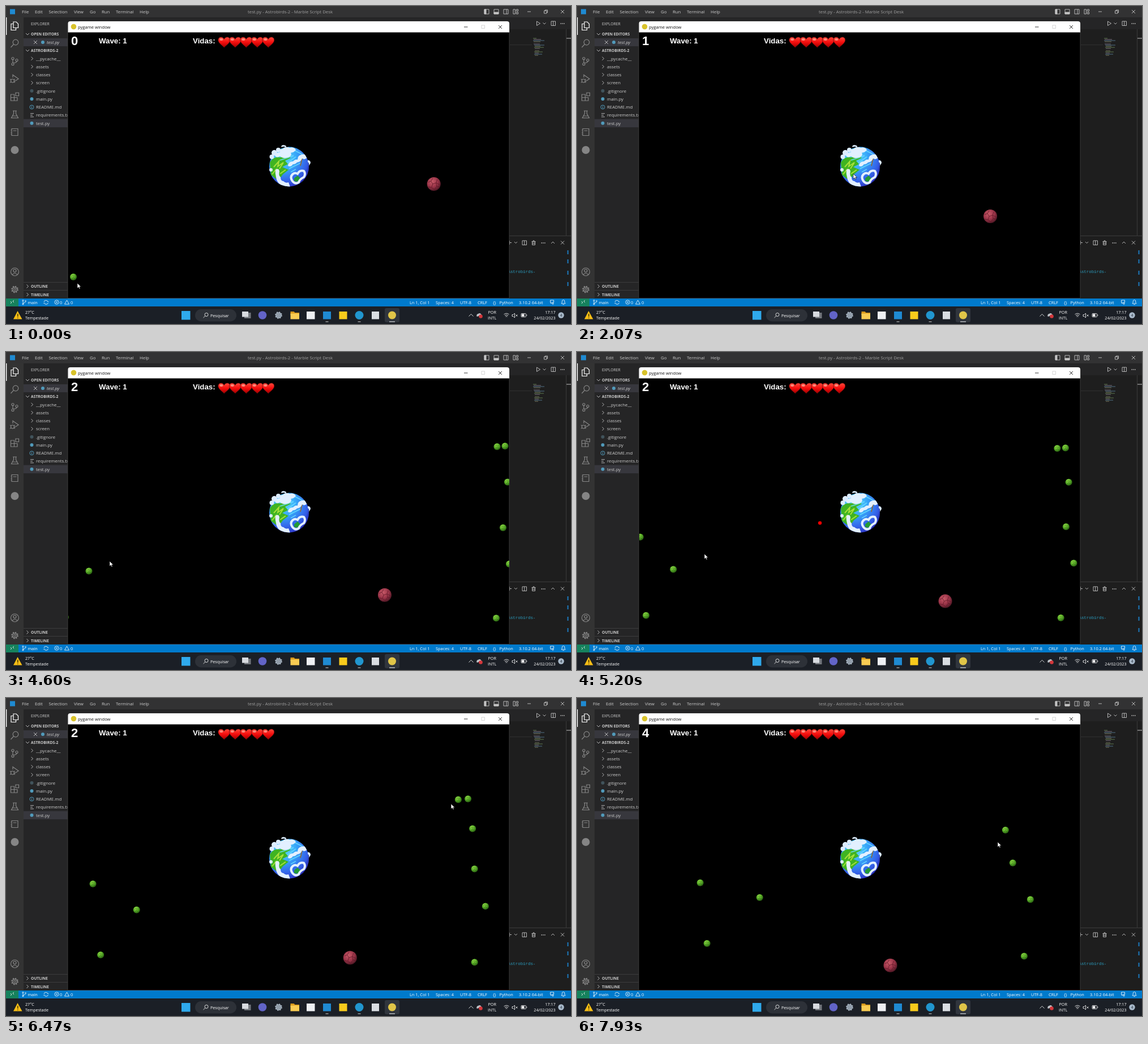
Recreate the animation shown at these times as an HTML page. Size 998 px wide and 561 px high, loop 8000 ms.

```html
<!DOCTYPE html>
<html lang="pt">
<head>
<meta charset="utf-8">
<title>Planet defence</title>
<style>
html, body { margin: 0; width: 100%; height: 100%; overflow: hidden; background: #1e1e1e; }
svg { display: block; width: 998px; height: 561px; }
text { font-family: "Open Sans", "Noto Sans", sans-serif; font-size: 7.8px; fill: #ccc; white-space: pre; }
.small { font-size: 6.8px; }
.bold { font-weight: 700; }
.status text { font-size: 7.4px; fill: #fff; }
.task text { font-size: 7.2px; fill: #fff; }
.hud text { font: 700 13.3px "Liberation Sans", Arial, sans-serif; fill: #fff; }
.hud .score { font-size: 22px; }
.line { fill: none; stroke: #c5c5c5; stroke-width: .9; }
.idle { fill: none; stroke: #858585; stroke-width: 1.2; }
.thin { fill: none; stroke: #fff; stroke-width: .8; }
</style>
</head>
<body>
<svg viewBox="0 0 998 561" xmlns="http://www.w3.org/2000/svg">
<defs>
  <clipPath id="field"><rect x="110" y="46.500" width="779" height="468"/></clipPath>
  <clipPath id="globe"><circle cx="500" cy="283.500" r="35"/></clipPath>
  <radialGradient id="sea" cx=".35" cy=".25" r=".85">
    <stop offset="0" stop-color="#62e0ff"/><stop offset=".4" stop-color="#36a4f8"/><stop offset=".7" stop-color="#3466ea"/><stop offset="1" stop-color="#2c2cc0"/>
  </radialGradient>
  <radialGradient id="leaf" cx=".38" cy=".3" r=".75">
    <stop offset="0" stop-color="#98e04a"/><stop offset=".5" stop-color="#58ac28"/><stop offset="1" stop-color="#22560e"/>
  </radialGradient>
  <radialGradient id="rust" cx=".38" cy=".32" r=".75">
    <stop offset="0" stop-color="#c85a68"/><stop offset=".55" stop-color="#9a3448"/><stop offset="1" stop-color="#451420"/>
  </radialGradient>
  <linearGradient id="red" x2="0" y2="1">
    <stop offset="0" stop-color="#ff4a3c"/><stop offset=".5" stop-color="#f50d0d"/><stop offset="1" stop-color="#a00000"/>
  </linearGradient>
  <g id="heart">
    <path d="M0 9C-4 5-10.500 1-10.500-4C-10.500-10-2.500-11 0-5.500C2.500-11 10.500-10 10.500-4C10.500 1 4 5 0 9Z" fill="url(#red)" stroke="#6d1010" stroke-width=".8"/>
    <ellipse cx="-5" cy="-5" rx="3" ry="2" fill="#ffb0a0" opacity=".7"/>
  </g>
  <g id="pod">
    <circle r="6" fill="url(#leaf)"/>
    <path d="M-4-1L-1-3L2-1L4-3M-3 3L0 1L3 3M-1-3L0 1" fill="none" stroke="#245c0c" stroke-width=".7" opacity=".6"/>
  </g>
  <path id="chev" d="M-1.500-3L1.500 0L-1.500 3"/>
  <path id="cross" d="M-3-3L3 3M3-3L-3 3"/>
  <g id="gear"><circle r="5" stroke-width="2.800" stroke-dasharray="1.960 1.960"/><circle r="4.200"/><circle r="1.800"/></g>
</defs>

<rect width="998" height="561" fill="#1e1e1e"/>
<rect width="998" height="20" fill="#323233"/>
<rect y="20" width="31" height="496" fill="#333"/>
<rect x="31" y="20" width="281" height="496" fill="#252526"/>
<rect x="312" y="20" width="686" height="21" fill="#252526"/>
<rect x="7" y="5.500" width="9" height="9" fill="#1f8ad2"/>
<g id="menu"></g>
<text x="427" y="13" style="fill:#a0a0a0">test.py - Astrobirds-2 - Marble Script Desk</text>
<g class="line">
  <path d="M845 6h8v8h-8zM862 6h8v8h-8zM879 6h8v8h-8zM884 6v8M896 6h3.500v8h-3.500zM901.500 6h3v3h-3zM901.500 11h3v3h-3z"/>
  <path d="M845 6h3v8h-3zM862 11h8v3h-8z" fill="#c5c5c5"/>
  <path d="M921 10h6M950.500 8.500h4.500v4.500h-4.500zM952 8.500v-1.500h4.500v4.500h-1.500"/>
  <use href="#cross" x="983" y="10"/>
</g>

<rect y="20" width="1.300" height="31" fill="#fff"/>
<g fill="none" stroke="#fff" stroke-width="1.200"><path d="M13 28h5l3.500 3.500v7h-8.500zM13 31.500h-4v11h8.500v-4"/></g>
<g class="idle">
  <circle cx="17" cy="64" r="4.800"/><path d="M13.500 67.500L8.500 73"/>
  <circle cx="12" cy="92.500" r="2"/><circle cx="12" cy="102.500" r="2"/><circle cx="19" cy="95.500" r="2"/><path d="M12 94.500v6M19 97.500q0 3-7 3"/>
  <path d="M12 126v-4.500L22 128.500L15 133"/><circle cx="11.500" cy="132" r="3"/><path d="M7 129l2 1M7 135l2-1M14 130l2-1M14 134l2 1"/>
  <path d="M8.500 156h6v11h-6zM8.500 161.500h11.500v5.500h-5.500M17 153h5.500v5.500h-5.500z"/>
  <path d="M12 185h7M13.500 185v5L9.500 197.500h12L17.500 190v-5M11.500 194h8"/>
  <path d="M10 216.500h11v12h-11zM12.500 220h6M8.500 219h1.500M8.500 223h1.500M8.500 226h1.500"/>
  <circle cx="15.500" cy="469" r="7"/><circle cx="15.500" cy="467" r="2.500"/><path d="M11 474q4.500-5 9 0"/>
  <use href="#gear" x="15.500" y="500"/>
</g>
<circle cx="15.500" cy="254" r="7" fill="#858585"/>

<g id="tree">
  <rect x="31" y="57" width="79" height="14" fill="#37373d"/>
  <rect x="31" y="199.500" width="79" height="14.500" fill="#37373d"/>
  <path d="M31 487.500h79M31 501.500h79" stroke="#3c3c3d"/>
  <text class="small" x="44" y="33.500">EXPLORER</text>
  <text class="small bold" x="44" y="52">OPEN EDITORS</text>
  <text class="small bold" x="44" y="80.800">ASTROBIRDS-2</text>
  <text class="small bold" x="44" y="497">OUTLINE</text>
  <text class="small bold" x="44" y="511.500">TIMELINE</text>
  <text x="72" y="67" font-style="italic">test.py</text>
  <g class="line">
    <path d="M35 48L38 51L41 48M35 77L38 80L41 77"/>
    <use href="#chev" x="38" y="494.500"/><use href="#chev" x="38" y="509"/>
    <use href="#cross" x="52" y="64"/>
  </g>
  <circle cx="65" cy="64" r="3" fill="#519aba"/>
</g>

<g class="line">
  <path d="M937.500 27v7.500l6-3.750zM948.500 29.500l2.500 2.500l2.500-2.500M963 27h7.500v7.500h-7.500zM966.750 27v7.500"/>
  <path d="M979.500 31h7" stroke-width="1.500" stroke-dasharray="1.500 1.250"/>
</g>
<path d="M890 68.500h39" stroke="#303030"/>
<path d="M989.500 41v364M889 405.500h109" stroke="#3a3a3a" fill="none"/>
<path d="M990 57h8" stroke="#aaa" stroke-width="1.200"/>
<g id="minimap"></g>
<g class="line">
  <path d="M886 417.500h7M889.500 414v7M898 416l2.500 2.500l2.500-2.500M912 414h7.500v7.500h-7.500zM915.750 414v7.500M928.500 415.500h7M929.500 415.500v6h5v-6M931 415.500v-1.500h2v1.500M931 417v3M933 417v3M963 419l3-3l3 3"/>
  <path d="M945.500 418h7" stroke-width="1.500" stroke-dasharray="1.500 1.250"/>
  <use href="#cross" x="983" y="417.500"/>
</g>
<text x="886.500" y="470.500" style="font:7.400px 'Liberation Mono',monospace;fill:#2b9ec0">Astrobirds-</text>
<path d="M992.500 431v7M992.500 447v7M992.500 467v7M992.500 487v7" stroke="#1b78bd" stroke-width="2"/>

<g class="status">
  <rect y="516" width="998" height="14" fill="#007acc"/>
  <rect y="516" width="22" height="14" fill="#16825d"/>
  <g id="status"></g>
  <g class="thin">
    <path d="M8 521l2 2l-2 2M14 519l-2 2l2 2M30 520v6M34.500 521.500q0 2-4.500 3"/>
    <circle cx="30" cy="519.500" r="1"/><circle cx="34.500" cy="520.500" r="1"/><circle cx="30" cy="526" r="1"/>
    <path d="M67 522a3.600 3.600 0 0 1 7 0l1.200-1.200M74.500 523.500a3.600 3.600 0 0 1-7 0l-1.200 1.200"/>
    <circle cx="89.500" cy="522.500" r="3.600"/><path d="M88 521l3 3M91 521l-3 3M107.500 519l4 7h-8z"/>
    <path d="M961.500 519h6v4h-3l-2 2v-2h-1zM981 525h7l-1.200-2v-2q0-2.500-2.300-2.500t-2.300 2.500v2zM983.500 526.500h2"/>
    <circle cx="966" cy="525" r="1.200"/>
  </g>
</g>

<g class="task">
  <rect y="530" width="998" height="31" fill="#1b1f26"/>
  <path d="M20.500 538L28.500 552.500H13z" fill="#f6bd16"/><path d="M20.800 543v5M20.800 549.500v1.200" stroke="#3a2a00" stroke-width="1.400"/>
  <rect x="310" y="538" width="15.500" height="15.500" fill="#2fa9ec"/>
  <rect x="334" y="535" width="73" height="21.500" rx="10.700" fill="#2d3138"/>
  <g class="thin"><circle cx="354" cy="544.500" r="3"/><path d="M351.800 546.800L348.500 550"/></g>
  <rect x="421" y="541" width="11.500" height="10" fill="#73777d"/><rect x="417" y="539" width="11" height="9.500" fill="#d8dbe0"/>
  <circle cx="453" cy="545.500" r="7.300" fill="#6264c7"/>
  <circle cx="481.500" cy="545.500" r="5.500" fill="#7d8894"/>
  <g fill="none" stroke="#a3b0bd" stroke-width="1.300"><use href="#gear" x="481.500" y="545.500"/></g>
  <path d="M502.500 539h6l2 2h7.500v4h-15.500z" fill="#d99a1c"/><rect x="502.500" y="542.500" width="15.500" height="10" fill="#f9cc53"/>
  <rect x="531" y="539" width="14.500" height="13.500" fill="#eef0f3"/>
  <rect x="560" y="539" width="14" height="13.500" fill="#1f8ad2"/>
  <rect x="588.500" y="539" width="14" height="13.500" fill="#f8cb1c"/>
  <circle cx="624" cy="545.500" r="7.500" fill="#2196cf"/>
  <rect x="646" y="539" width="13" height="13.500" fill="#d9dde2"/>
  <rect x="669" y="533" width="26" height="25" rx="3" fill="#30353d"/>
  <circle cx="682" cy="545.500" r="7" fill="#e0c548"/>
  <path d="M564.500 557h5M621.500 557h5" stroke="#999" stroke-width="1.500"/><path d="M677 557h10" stroke="#b8bcc2" stroke-width="1.500"/>
  <g class="thin">
    <path d="M817.500 547.500l4-4l4 4"/><path d="M879.500 544q4.500-3.500 9 0M881 546q3-2.200 6 0M882.500 548q1.500-1 3 0"/>
    <path d="M894 544.500h2l2.500-2.500v8l-2.500-2.500h-2zM900.500 544.500l3 3M903.500 544.500l-3 3"/>
    <rect x="910" y="542.500" width="8.500" height="6" rx="1"/><path d="M920 544.500v2"/>
  </g>
  <rect x="911" y="543.500" width="4.500" height="4" fill="#fff"/>
  <path d="M832 548a3 3 0 0 1 2-5q4-2.500 6 2" fill="#bfc3c8"/><circle cx="838.500" cy="547.500" r="3.300" fill="#d4373b"/>
  <g id="tray"></g>
  <circle cx="980.500" cy="545.500" r="5.200" fill="#a9bacb"/><text x="978.800" y="548" style="font-size:6.500px;fill:#16202c">4</text>
</g>

<path d="M109 515.500V31q0-4 4-4H885q4 0 4 4V515.500z" fill="#000" stroke="#444" stroke-width=".8"/>
<path d="M109.500 46.500V31q0-4 4-4H885q4 0 4 4V46.500z" fill="#fff"/>
<circle cx="119.500" cy="36.500" r="4.800" fill="#d9c32b"/>
<text x="127" y="39.500" style="font-size:7.600px;fill:#111">pygame window</text>
<g class="line" style="stroke:#222"><path d="M809 37h6.500"/><use href="#cross" x="873" y="37"/></g>
<rect x="840" y="34" width="5.500" height="5.500" fill="none" stroke="#ccc" stroke-width=".8"/>

<g clip-path="url(#field)">
  <g class="hud">
    <text class="score" id="score" x="115" y="68.500">0</text>
    <text x="164" y="66.300">Wave: 1</text><text x="330" y="66.300">Vidas:</text>
    <g id="lives"></g>
  </g>
  <g id="shots"></g>
  <g>
    <circle cx="500" cy="283.500" r="35" fill="url(#sea)"/>
    <g clip-path="url(#globe)">
      <path d="M466 276Q472 265 484 267L498 264L503 268L493 273L498 279L488 284L499 289L489 297L484 304L477 305L468 298Z" fill="#3fb422"/>
      <path d="M473 284l9-10l-2 9l10-7l-7 11M470 297l8-10M484 296l10-7" fill="none" stroke="#a8e03a" stroke-width="2"/>
      <path d="M484 272L508 264M497 277L512 266M500 287L520 277M508 254L524 262M503 293L512 288" stroke="#6ce0ff" stroke-width="2" opacity=".75"/>
      <path d="M509 304l6-5l5 5l-5 6l-6-1z" fill="#239a35"/>
      <path d="M519 267l4 2l-3 13" fill="none" stroke="#91672d" stroke-width="1.600"/>
      <path d="M536 262Q536 300 503 320L540 321Z" fill="#2424a8" opacity=".35"/>
      <g fill="#e2f0ff">
        <path d="M484 258Q483 252 489 252Q494 246 501 250Q509 248 512 254Q508 259 503 259Q506 264 499 267Q489 270 484 265Q478 269 475 264Q477 258 484 258Z"/>
        <path d="M498 282Q499 274 507 274Q511 270 515 271Q515 263 523 262Q531 260 532 267Q529 272 523 269Q521 275 514 276Q511 280 507 279Q503 285 498 282Z"/>
        <path d="M476 289Q482 285 483 292Q481 299 485 302Q485 309 490 309Q494 313 499 311L502 319H489Q478 312 477 302Q475 295 476 289Z"/>
      </g>
      <path d="M506 309Q501 302 506 297Q510 293 515 296Q519 289 526 291Q530 296 526 302Q519 305 517 311Q511 315 506 309" fill="none" stroke="#e2f0ff" stroke-width="4"/>
    </g>
    <g fill="#dcecff">
      <circle cx="474" cy="259" r="5"/><circle cx="469.500" cy="266" r="4"/><circle cx="481" cy="254" r="4"/>
      <circle cx="468" cy="289" r="3"/><path d="M486 249l1-3q4-2 8 1v2l-5-1zM533 272q5 0 5 5l-3 5q1-5-2-7z"/>
    </g>
  </g>
  <g id="enemies"></g>
  <g id="rock">
    <circle r="12" fill="url(#rust)"/>
    <path d="M-10-3L-5-5L-2-10M-5-5L-2 0L4-2L6-8M4-2L10 1M-2 0L-4 6L-10 5M-4 6L1 10M1 10L5 4L4-2M5 4L10 5" fill="none" stroke="#5c1626" stroke-width="1" opacity=".75"/>
  </g>
</g>
<path id="cursor" d="M0 0V9L2.200 7L3.700 10.200L5.100 9.500L3.700 6.500H6.600Z" fill="#fff" stroke="#000" stroke-width=".6"/>
</svg>

<script>
const $ = id => document.getElementById(id);
const label = (x, y, s, extra = '') => `<text x="${x}" y="${y}" ${extra}>${s}</text>`;
const row = (y, items) => items.map(([x, s]) => label(x, y, s)).join('');

$('menu').innerHTML = row(13, [[28, 'File'], [51, 'Edit'], [75.5, 'Selection'], [120, 'View'],
  [148, 'Go'], [169, 'Run'], [194, 'Terminal'], [236, 'Help']]);
$('status').innerHTML = row(525.5, [[38.5, 'main'], [95, '0'], [114, '0'], [713, 'Ln 1, Col 1'], [759, 'Spaces: 4'],
  [802, 'UTF-8'], [833, 'CRLF'], [860, '{}'], [871.5, 'Python'], [906, '3.10.2 64-bit']]);
$('tray').innerHTML = row(543.3, [[34, '27°C'], [851.5, 'POR']]) + row(553.3, [[34, 'Tempestade'], [851, 'INTL']]) +
  label(361, 548.5, 'Pesquisar') + label(970.5, 543.3, '17:17', 'text-anchor="end"') +
  label(970.5, 553.3, '24/02/2023', 'text-anchor="end"');

const files = ['__pycache__', 'assets', 'classes', 'screen', '.gitignore', 'main.py', 'README.md', 'requirements.txt', 'test.py'];
$('tree').innerHTML += files.map((name, i) => {
  const y = 92.7 + i * 14.27;
  let icon = `<circle cx="45.500" cy="${y}" r="3" fill="${i === 4 ? '#41535b' : '#519aba'}"/>`;
  if (i < 4) icon = `<use href="#chev" x="46" y="${y}" class="line"/>`;
  if (i === 6) icon = `<g fill="none" stroke="#519aba"><circle cx="45.500" cy="${y}" r="3.500"/><path d="M45.500 ${y - .5}v2.500M45.500 ${y - 2}v1"/></g>`;
  if (i === 7) icon = `<path class="line" d="M43 ${y - 3}h6M43 ${y}h4M43 ${y + 3}h6"/>`;
  return icon + label(53, y + 2.9, name);
}).join('');

const codeColors = ['#6f8f5c', '#8a7b8f', '#5d86a0', '#8d8d70'];
$('minimap').innerHTML = Array.from({ length: 17 }, (_, i) => i % 6 === 4 ? '' :
  `<rect x="${931 + (i > 5) * 2 + i % 2}" y="${56.5 + i * 2}" width="${6 + i * 7 % 15}" height="1" fill="${codeColors[i % 4]}" opacity=".8"/>`).join('');
$('lives').innerHTML = Array.from({ length: 5 }, (_, i) => `<use href="#heart" x="${385.3 + i * 19.5}" y="64"/>`).join('');

const LOOP = 8000, STEP = 200 / 3, HOME = [499, 281], SHOT_SPEED = .45;
const HITS = [1060, 4270, 7300, 7735];
const times = [0, 2070, 3600, 4600, 5800, 7130, 7930];

// Each flight: index of its first key time, its points, and when it is hit.
const flights = [
  [0, [[119, 478], [190, 454]], HITS[0]],
  [2, [[137.5, 181], [173, 189]], HITS[1]],
  [2, [[113.5, 390], [146.5, 386.5], [197, 379.5], [269, 366], [322.5, 352]]],
  [2, [[884, 468], [866, 469.5], [842.5, 468], [811.5, 463], [790, 455.5]]],
  [3, [[881.5, 166], [842, 173], [787.5, 183.5]], HITS[3]],
  [3, [[867.5, 167], [826.5, 174], [768, 185.5]], HITS[2]],
  [3, [[886, 229.5], [849, 230], [796, 231.5], [757, 233]]],
  [3, [[878, 310], [848, 305.5], [804, 297], [770, 291]]],
  [3, [[889, 374], [864, 370.5], [827.5, 363], [801, 355.5]]],
  [3, [[105, 468], [142, 460], [194.5, 445], [229.5, 433]]],
  [4, [[130, 327.5], [180.5, 327.5], [217.5, 326]]]
];
// Each shot: launch time, a point on its line, and when it ends.
const shots = [[182, 150, 466, HITS[0]], [3466, 441.5, 264, HITS[1]], [5038, 170, 378, 6000],
  [6680, 690.5, 213.5, HITS[2]], [7120, 760, 190, HITS[3]]];
const pointer = [[0, 126, 489], [300, 126, 487], [1500, 488, 296], [2300, 488, 296], [3300, 130, 180], [3700, 130, 180],
  [4500, 183, 369], [5050, 183, 369], [5800, 587, 246], [6600, 802, 182], [7200, 802, 182], [7930, 743, 254]];

// Smooth polynomial through a flight's points.
function along(first, points, t) {
  const sum = [0, 0];
  points.forEach((p, i) => {
    let w = 1;
    points.forEach((_, j) => {
      if (j !== i) w *= (t - times[first + j]) / (times[first + i] - times[first + j]);
    });
    sum[0] += w * p[0];
    sum[1] += w * p[1];
  });
  return sum;
}

function pointerAt(t) {
  if (t >= pointer.at(-1)[0]) return pointer.at(-1).slice(1);
  const i = Math.max(1, pointer.findIndex(k => k[0] >= t));
  const [a, b] = [pointer[i - 1], pointer[i]];
  const u = (t - a[0]) / (b[0] - a[0]), e = u * u * (3 - 2 * u);
  return [a[1] + (b[1] - a[1]) * e, a[2] + (b[2] - a[2]) * e];
}

function place(node, [x, y], shown = true) {
  node.setAttribute('transform', `translate(${x.toFixed(2)} ${y.toFixed(2)})`);
  node.setAttribute('visibility', shown ? 'visible' : 'hidden');
}

$('enemies').innerHTML = flights.map(() => '<use href="#pod"/>').join('');
$('shots').innerHTML = shots.map(() => '<circle r="3.200" fill="#f00000"/>').join('');
const pods = $('enemies').children, balls = $('shots').children;

function draw(t) {
  flights.forEach(([first, points, end = LOOP], i) =>
    place(pods[i], along(first, points, t), t >= times[first] - 900 && t < end));
  shots.forEach(([start, x, y, end], i) => {
    const dx = x - HOME[0], dy = y - HOME[1], k = (t - start) * SHOT_SPEED / Math.hypot(dx, dy);
    place(balls[i], [HOME[0] + dx * k, HOME[1] + dy * k], t >= start && t < end);
  });
  const angle = .17 + t * .00015;
  place($('rock'), [HOME[0] + 260.5 * Math.cos(angle), HOME[1] + 195 * Math.sin(angle)]);
  place($('cursor'), pointerAt(t));
  $('score').textContent = HITS.filter(h => t >= h).length;
}

// Frame delays are rounded to 10 ms, so a step may begin slightly early.
const begin = performance.now();
function frame(now) {
  const t = Math.max(0, now - begin) % LOOP;
  draw(Math.floor(t / STEP + .15) * STEP);
  requestAnimationFrame(frame);
}
draw(0);
requestAnimationFrame(frame);
</script>
</body>
</html>
```
